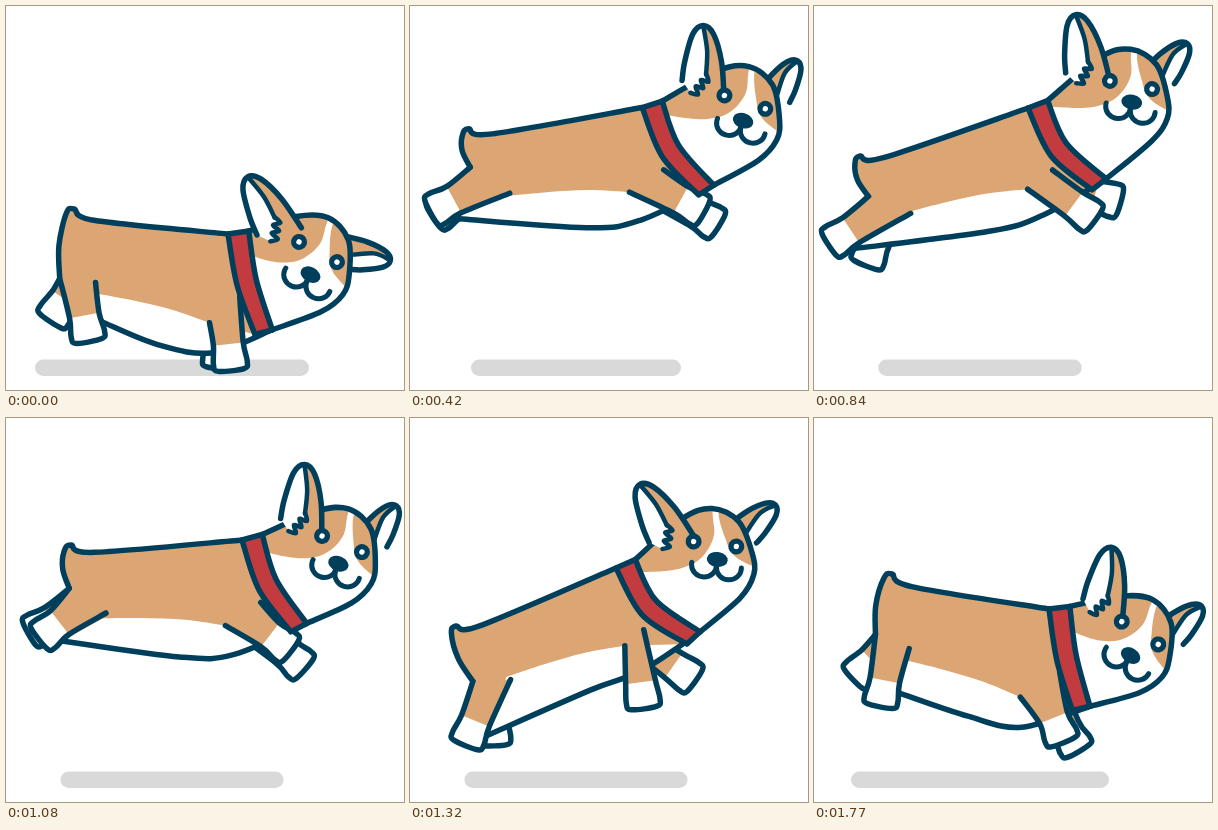
An HTML page with a canvas for the animation above (1.8 s loop, 398 px wide and 384 px high).

```html
<!DOCTYPE html>
<html lang="en">
<head>
<meta charset="utf-8">
<title>Hopping corgi</title>
<style>
html, body { margin: 0; width: 100%; height: 100%; overflow: hidden; background: #fff; }
canvas { display: block; width: 398px; height: 384px; }
</style>
</head>
<body>
<canvas id="stage" width="398" height="384"></canvas>
<script>
const ctx = document.getElementById('stage').getContext('2d');
const NAVY = '#003f5c', TAN = '#dba574', RED = '#c23b3f', WHITE = '#fff', GREY = '#d8d9d8';
const HOP = 600, STEP = 30, DEG = Math.PI / 180;

// Joint motion: values at land, push, rise, fall and reach
const KEYS = [0, 120, 240, 480, 570];
const JOINTS = {
  tail: [[68, 46, 46, 65, 78], [203, 208, 150, 127, 156]],
  neck: [[222, 206, 214, 236, 235], [228, 150, 102, 122, 191]],
  head: [[312, 305, 317, 336, 326], [246, 126, 79, 126, 215]],
  hind: [[83, 56, 16, 34, 66], [334, 326, 238, 220, 287]],
  front: [[225, 234, 280, 284, 249], [363, 289, 213, 232, 323]],
  farHind: [[45, 84, 52, 24, 40], [314, 326, 258, 215, 260]],
  farFront: [[213, 284, 305, 298, 264], [361, 262, 196, 250, 332]],
  lean: [[15, 43, 38, 28, 13]],
  tilt: [[28, 6.5, 11, 22, 32]],
  ears: [[-30, -30, -11, 3, 8], [100, 49, 40, 35, 48]]
};

// Smooth cyclic interpolation with uneven key spacing
function track(values, t) {
  const n = KEYS.length;
  const i = KEYS.findLastIndex(k => k <= t);
  const time = j => KEYS[(j + n) % n] + HOP * Math.floor(j / n);
  const [a, b, c, d] = [-1, 0, 1, 2].map(j => values[(i + j + n) % n]);
  const [h0, h, h1] = [-1, 0, 1].map(j => time(i + j + 1) - time(i + j));
  const slope = (p, q, r, u, v) => {
    const parabola = ((q - p) / u * v + (r - q) / v * u) / (u + v);
    return 0.4 * (r - p) / (u + v) + 0.6 * parabola;
  };
  const s = (t - time(i)) / h;
  const m = slope(a, b, c, h0, h) * h, k = slope(b, c, d, h, h1) * h;
  return b + s * (m + s * (3 * (c - b) - 2 * m - k + s * (2 * (b - c) + m + k)));
}

function jointsAt(t) {
  const out = {};
  for (const name in JOINTS) out[name] = JOINTS[name].map(v => track(v, t));
  return out;
}

// Maps local points of a rotated frame to the stage
function frame([ox, oy], deg) {
  const c = Math.cos(deg * DEG), s = Math.sin(deg * DEG);
  return (x, y) => [ox + x * c - y * s, oy + x * s + y * c];
}

const angle = ([ax, ay], [bx, by]) => Math.atan2(by - ay, bx - ax) / DEG;
const middle = (a, b) => [(a[0] + b[0]) / 2, (a[1] + b[1]) / 2];

// Smooth curves through runs of points, joined by straight lines
function shape(...runs) {
  const path = new Path2D();
  runs.forEach((p, r) => {
    const at = i => p[Math.max(0, Math.min(p.length - 1, i))];
    path[r ? 'lineTo' : 'moveTo'](...p[0]);
    for (let i = 0; i < p.length - 1; i++) {
      const out = at(i).map((v, k) => v + (at(i + 1)[k] - at(i - 1)[k]) / 6);
      const into = at(i + 1).map((v, k) => v - (at(i + 2)[k] - at(i)[k]) / 6);
      path.bezierCurveTo(...out, ...into, ...at(i + 1));
    }
  });
  return path;
}

function fill(path, colour) {
  ctx.fillStyle = colour;
  ctx.fill(path);
}

const ink = (...runs) => runs.forEach(run => ctx.stroke(shape(run)));

function within(path, draw) {
  ctx.save();
  ctx.clip(path);
  draw();
  ctx.restore();
}

function local([x, y], deg, draw) {
  ctx.save();
  ctx.translate(x, y);
  ctx.rotate(deg * DEG);
  draw();
  ctx.restore();
}

function dot(x, y, rx, ry, colour) {
  ctx.fillStyle = colour;
  ctx.beginPath();
  ctx.ellipse(x, y, rx, ry, 0, 0, 7);
  ctx.fill();
}

function shadow(t) {
  const w = 202 + 72 * Math.pow(Math.abs(1 - t / 300), 2.4);
  ctx.fillStyle = GREY;
  ctx.beginPath();
  ctx.roundRect(166 - w / 2, 353.5, w, 16.5, 8.2);
  ctx.fill();
}

// Outline of a leg from two hip points around its sole
function legOutline(back, front, sole) {
  const foot = frame(sole, angle(middle(back, front), sole) - 90);
  return [back, foot(-15, -25), foot(-17, -6), foot(-13, 1),
    foot(13, 1), foot(17, -6), foot(15, -25), front];
}

function leg(outline) {
  fill(shape(outline), TAN);
  fill(shape(outline.slice(1, 7)), WHITE);
  ink(outline);
}

// Rounded ear with its base at the origin; skew slants the base
function ear(length, width, skew, fluffy) {
  const side = k => [[k, -k * skew / length], [k * 0.88, 0.42], [k * 0.5, 0.86]]
    .map(([x, y]) => [x * width, -y * length]);
  const tip = [0, -length];
  const left = [...side(-1), tip], right = [tip, ...side(1).reverse()];
  const outline = [...left, ...right.slice(1)];
  const fold = [tip, [4 * Math.sign(skew), -0.6 * length], [3, fluffy ? -14 : 1]];
  fill(shape(outline), TAN);
  fill(fluffy ? shape(left, fold, tuft()) : shape(right, fold.slice().reverse()), WHITE);
  ink(outline);
  ctx.lineWidth = 4.5;
  ink(fold);
  if (fluffy) ink(tuft());
}

function tuft() {
  const points = [];
  for (let i = 0; i < 7; i++) {
    const zig = i % 2 ? 3 : -2;
    points.push([5 - 2.6 * i + zig, -13 + 3.2 * i + zig]);
  }
  return points;
}

function face(drop) {
  for (const x of [-21.5, 21.5]) {
    dot(x, 0, 8, 8, NAVY);
    dot(x, 0, 2.7, 2.7, WHITE);
  }
  ctx.translate(4, drop);
  dot(0, 0, 10.5, 7.5, NAVY);
  ctx.lineWidth = 5;
  for (const x of [-12.5, 12.5]) {
    ctx.beginPath();
    ctx.ellipse(x, 7, 12.5, 12, 0, -0.1, Math.PI + 0.1);
    ctx.stroke();
  }
}

function head(j, left, right) {
  const tilt = j.tilt[0];
  const at = frame(j.head, tilt);
  const crown = [right[0], at(-36, -21), at(-7, -35), at(21, -25),
    at(38, 5), at(42, 26), at(31, 51), right[2]];
  const skull = shape(crown, right.slice().reverse());
  local(at(26, -13), j.ears[1], () => ear(44, 16, -5, false));
  fill(skull, WHITE);
  within(skull, () => local(j.head, tilt, () => {
    fill(shape([[-7, -60], [-6, -31], [-2, -9], [-9, 11], [-23, 24], [-49, 33], [-110, 41]],
      [[-110, -60]]), TAN);
    fill(shape([[0, -60], [0, -31], [10, -6], [20, 9], [41, 18], [70, 24]], [[70, -60]]), TAN);
  }));
  ink(crown);
  const collar = shape(left, right.slice().reverse());
  collar.closePath();
  fill(collar, RED);
  ctx.stroke(collar);
  local(at(-44, 0), j.ears[0], () => ear(63, 21, 8, true));
  local(j.head, tilt, () => face(28 - 0.3 * j.lean[0]));
}

function corgi(j) {
  const slope = angle(j.tail, j.neck);
  const body = frame(j.tail, slope);
  const depth = 116 + slope / 2;

  const lean = j.lean[0], bulge = 0.3 * lean;
  const neck = frame(j.neck, -lean);
  const left = [j.neck, neck(-bulge, 52), neck(0, 104)];
  const right = [frame(j.neck, -0.55 * lean)(21, 0), neck(20 - bulge, 51), neck(18, 104)];

  // The rump lifts as the hind leg swings back
  const swing = angle(body(15, 65), j.hind) - 90;
  const rump = 67 - 0.4 * swing;
  const hips = [body(-3, rump), body(33, 69)];
  const shoulders = [body(152, depth - 30), neck(4 - 0.6 * lean, 64)];
  const hind = legOutline(...hips, j.hind);

  leg(legOutline(...hips, j.farHind));
  leg(legOutline(...shoulders, j.farFront));

  const back = [hips[0], body(-9, 0.55 * rump), body(-7, 6), j.tail, body(23, 8), j.neck];
  const belly = [right[2], body(160, depth - 1), body(105, depth), middle(hind[5], hind[6])];
  const torso = shape(back, left, belly);
  fill(torso, TAN);
  within(torso, () => fill(shape(
    [body(30, depth - 41), body(70, depth - 40), body(112, depth - 37), shoulders[0]],
    [left[2]], belly), WHITE));
  ink(back, belly);

  leg(hind);
  leg(legOutline(...shoulders, j.front));
  head(j, left, right);
}

function render(t) {
  ctx.fillStyle = WHITE;
  ctx.fillRect(0, 0, 398, 384);
  ctx.strokeStyle = NAVY;
  ctx.lineWidth = 5.5;
  ctx.lineCap = ctx.lineJoin = 'round';
  shadow(t);
  corgi(jointsAt(t));
}

const start = performance.now();
function tick() {
  const t = Math.max(0, performance.now() - start) % HOP;
  render(Math.floor(t / STEP) * STEP);
  requestAnimationFrame(tick);
}
tick();
</script>
</body>
</html>
```
